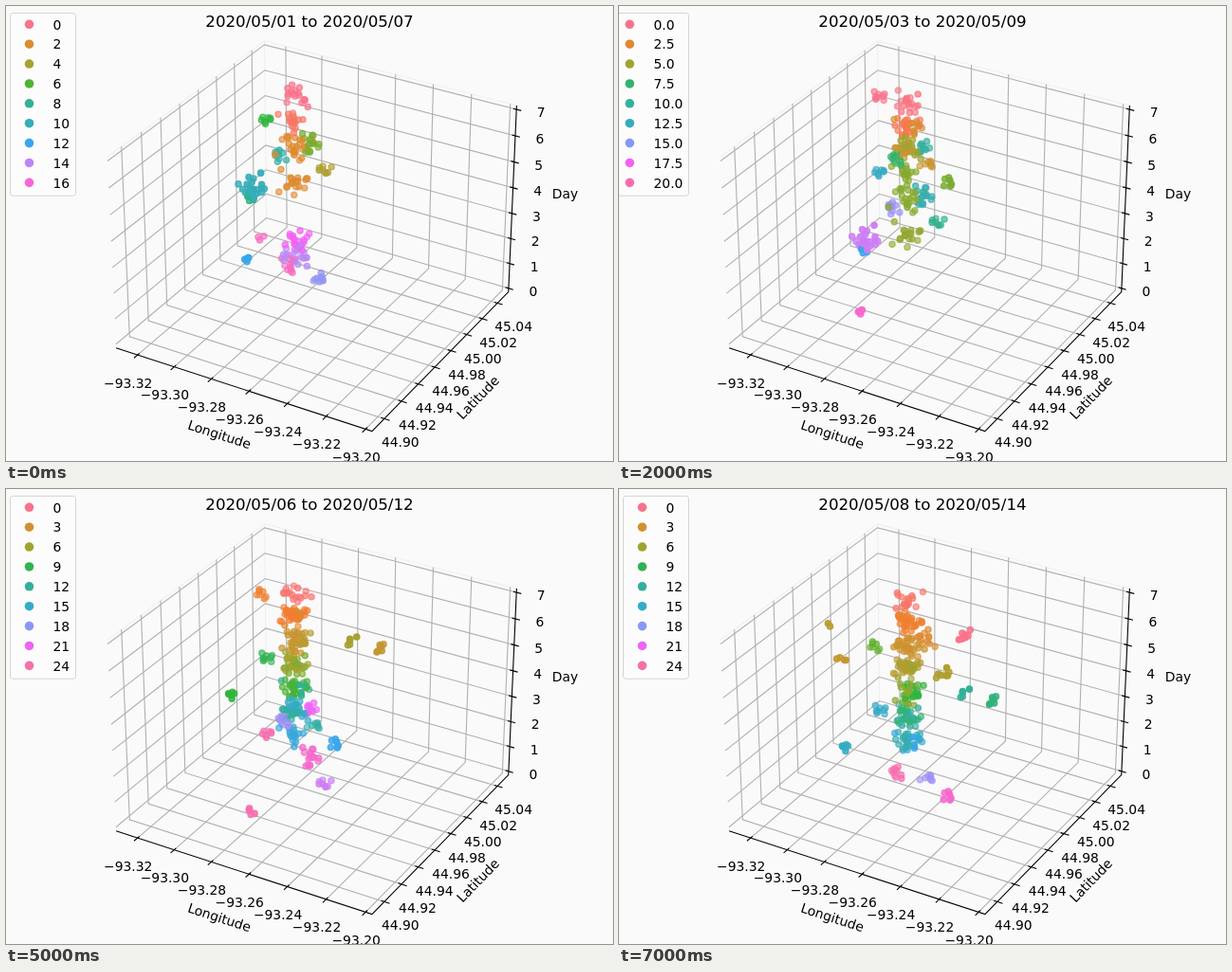
Write an HTML page that moves like this. It is 640 by 480 pixels and loops after 8000 ms.

```html
<!DOCTYPE html>
<html lang="en">
<head>
<meta charset="utf-8">
<title>Clusters by day</title>
<style>
html, body { margin: 0; width: 100%; height: 100%; overflow: hidden; background: #fafafa; }
svg { display: block; width: 640px; height: 480px; font: 13.89px "DejaVu Sans", sans-serif; }
</style>
</head>
<body>
<svg id="stage" viewBox="0 0 640 480" xmlns="http://www.w3.org/2000/svg"></svg>
<script>
const stage = document.getElementById('stage');
const FALL = 27.6;     // pixels a point sinks per day
const DAYS = 8;

function add(parent, tag, attrs, text) {
  const el = document.createElementNS(stage.namespaceURI, tag);
  for (const key in attrs) el.setAttribute(key, attrs[key]);
  if (text !== undefined) el.textContent = text;
  parent.appendChild(el);
  return el;
}
const times = (n, fn) => { for (let i = 0; i < n; i++) fn(i); };

// HUSL colour for a part (0..1) of the hue circle: saturation 90, lightness 65
const RGB = [
  [3.24097, -1.537383, -0.498611],
  [-0.969244, 1.875968, 0.041555],
  [0.05563, -0.203977, 1.056972]
];
function husl(part) {
  const L = 65, a = (part + 0.01) * 359 * Math.PI / 180;
  const s = Math.pow(L + 16, 3) / 1560896;
  let reach = Infinity;
  for (const [p, q, r] of RGB) for (const t of [0, 1]) {
    const low = (632260 * r - 126452 * q) * s + 126452 * t;
    const slope = (284517 * p - 94839 * r) * s / low;
    const base = ((838422 * r + 769860 * q + 731718 * p) * L * s - 769860 * t * L) / low;
    const len = base / (Math.sin(a) - slope * Math.cos(a));
    if (len > 0) reach = Math.min(reach, len);
  }
  const c = reach * 0.9 / (13 * L);
  const u = c * Math.cos(a) + 0.19783, v = c * Math.sin(a) + 0.46832;
  const Y = Math.pow((L + 16) / 116, 3), X = 9 * Y * u / (4 * v);
  const Z = (9 * Y - 15 * v * Y - v * X) / (3 * v);
  const out = RGB.map(([p, q, r]) => {
    const n = p * X + q * Y + r * Z;
    const g = n <= 0.0031308 ? 12.92 * n : 1.055 * Math.pow(n, 1 / 2.4) - 0.055;
    return Math.round(255 * Math.max(0, Math.min(1, g)));
  });
  return `rgb(${out})`;
}

// Perspective view of the box; arguments run 0..1 along each axis
function project(fx, fy, fz) {
  const x = (fx - 0.5) * 1.1428, y = (fy - 0.5) * 1.1428, z = (fz - 0.5) * 0.846;
  const k = 10 / (10 - (0.433 * x - 0.75 * y + 0.5 * z));
  return [326.6 + 270.5 * k * (0.866 * x + 0.5 * y),
          233.2 - 271.5 * k * (-0.25 * x + 0.433 * y + 0.866 * z)];
}
function line(color, ...pts) {
  const points = pts.map(p => project(...p).map(n => n.toFixed(2)).join()).join(' ');
  add(stage, 'polyline', { points, fill: 'none', stroke: color, 'stroke-width': 1.11 });
}
function label(p, dx, dy, text) {
  const [x, y] = project(...p);
  add(stage, 'text', { x: x + dx, y: y + dy + 5, 'text-anchor': 'middle' }, text);
}
function axisName(x, y, turn, text) {
  add(stage, 'text', { transform: `translate(${x} ${y}) rotate(${turn})`, y: 5, 'text-anchor': 'middle' }, text);
}

const GRID = '#b0b0b0', INK = '#000', EDGE = '#f0f0f0';
const tickX = i => 0.088 + 0.148 * i;
const tickY = i => 0.083 + 0.1185 * i;
const tickZ = i => 0.02 + 0.96 * i / 7;

function drawAxes() {
  line(EDGE, [0, 0, 1], [0, 1, 1], [1, 1, 1]);
  line(EDGE, [0, 1, 0], [0, 1, 1]);
  times(7, i => { const f = tickX(i); line(GRID, [f, 0, 0], [f, 1, 0], [f, 1, 1]); });
  times(8, i => { const f = tickY(i); line(GRID, [1, f, 0], [0, f, 0], [0, f, 1]); });
  times(8, i => { const f = tickZ(i); line(GRID, [0, 0, f], [0, 1, f], [1, 1, f]); });
  line(INK, [0, 0, 0], [1, 0, 0], [1, 1, 0], [1, 1, 1]);
  times(7, i => {
    const f = tickX(i);
    line(INK, [f, 0.012, 0], [f, -0.022, 0]);
    label([f, 0, 0], -10, 29.5, '\u2212' + (93.32 - 0.02 * i).toFixed(2));
  });
  times(8, i => {
    const f = tickY(i);
    line(INK, [0.988, f, 0], [1.02, f, 0]);
    label([1, f, 0], 17, 25, (44.9 + 0.02 * i).toFixed(2));
  });
  times(8, i => {
    const f = tickZ(i);
    line(INK, [0.988, 1, f], [1.018, 1, f]);
    label([1, 1, f], 26, 3, i);
  });
  axisName(225, 452, 18, 'Longitude');
  axisName(497.5, 413, -46, 'Latitude');
  axisName(589.5, 198, 0, 'Day');
}

let seed = 11;
function rand() {
  seed = (seed * 16807) % 2147483647;
  return seed / 2147483647;
}
const spread = r => (rand() + rand() - 1) * r * 1.2;

// A cluster appears on day `first` around x, y; it then sinks and moves along
// the hue circle by `rate` a day. More points make it wider.
const points = [];
function cluster(first, hue, n, x, y, days = 7, rate = 0.12) {
  const r = 2.5 + 0.55 * n;
  const near = Math.abs(x - 300) > 38 ? 0.92 : 0.68;
  times(n, () => points.push({
    first, hue, days, rate,
    x: x + spread(r * 1.15), y: y + spread(r),
    alpha: near * (0.85 + 0.23 * rand())
  }));
}

function fillData() {
  // The busy column: new arrivals at the top every day
  times(DAYS, d => {
    const y = 96 + 3 * d, rate = 0.12 - 0.012 * d;
    cluster(d, 0.005 * d, 17, 306, y, 7, rate);
    cluster(d, 0.04 + 0.005 * d, 17, 303, y + 24, 6, rate);
  });
  // Lower column, already there on the first day
  cluster(0, 0.1, 24, 304, 152, 5, 0.09);
  cluster(0, 0.1, 19, 305, 186, 4, 0.08);
  cluster(0, 0.85, 18, 306, 250, 2);
  cluster(0, 0.77, 17, 304, 265, 1);
  cluster(0, 0.92, 10, 299, 274, 1);
  // Places around it
  cluster(0, 0.3, 16, 321, 146, 6);
  cluster(0, 0.2, 8, 334, 173);
  cluster(0, 0.35, 7, 276, 119, 6);
  cluster(0, 0.5, 9, 287, 160, 3);
  cluster(0, 0.56, 20, 260, 190, 3);
  cluster(0, 0.42, 5, 257, 204, 6);
  cluster(0, 0.66, 5, 256, 267, 3);
  cluster(0, 0.73, 9, 331, 288, 1);
  cluster(0, 0.92, 3, 268, 246, 1);

  cluster(1, 0.02, 7, 325, 139);
  cluster(1, 0.26, 10, 292, 131);
  cluster(1, 0.18, 6, 346, 158);
  cluster(1, 0.36, 9, 322, 120, 6);
  cluster(2, 0, 8, 276, 95);
  cluster(3, 0.11, 7, 239, 162);
  cluster(5, 0.08, 7, 268, 109);
  cluster(5, 0.22, 5, 366, 159);
  cluster(5, 0.16, 6, 396, 168);
  cluster(6, 0.08, 7, 343, 168);
  cluster(7, 0, 7, 365, 154);
  cluster(7, 0.1, 12, 322, 157);
  cluster(7, 0.18, 2, 221, 143);
  cluster(7, 0.15, 4, 234, 180);
  points.sort((p, q) => p.alpha - q.alpha);
}

function drawPoints(group, day) {
  for (const p of points) {
    const age = day - p.first;
    if (age < 0 || age >= p.days) continue;
    const color = husl(Math.min(0.95, p.hue + p.rate * age));
    add(group, 'circle', {
      cx: (p.x + (326 - p.x) * 0.004 * age).toFixed(2),
      cy: (p.y + FALL * age).toFixed(2),
      r: 3.1, fill: color, 'fill-opacity': p.alpha,
      stroke: color, 'stroke-opacity': p.alpha, 'stroke-width': 1.39
    });
  }
}

const tops = [17, 18, 20, 20, 20, 24, 22, 24];    // highest cluster number per day

function drawLegend(group, day) {
  const top = tops[day], step = top > 22 ? 3 : top > 18 ? 2.5 : 2;
  const wide = step === 2.5, left = wide ? -8.5 : 4.5;
  const rows = Math.floor(top / step) + 1;
  add(group, 'rect', { x: left, y: 7.5, width: 73.5 - left, height: rows * 20.9 + 4.6,
    rx: 2.8, fill: '#fff', 'fill-opacity': 0.5, stroke: '#ccc', 'stroke-opacity': 0.8 });
  times(rows, i => {
    const v = i * step, y = 19.3 + 20.88 * i;
    const whole = v % 1 ? 2 * Math.round(v / 2) : v;    // halves go to the even side
    add(group, 'circle', { cx: wide ? 11.3 : 24.5, cy: y, r: 4.8, fill: husl(whole / (top + 1)) });
    add(group, 'text', { x: wide ? 36.5 : 49.5, y: y + 5.2 }, wide ? v.toFixed(1) : v);
  });
}

drawAxes();
fillData();
const live = add(stage, 'g', {});
let shown = -1;

function render(now) {
  const day = Math.floor(now / 1000) % DAYS;
  if (day === shown) return;
  shown = day;
  live.replaceChildren();
  drawPoints(live, day);
  const date = d => '2020/05/' + String(d).padStart(2, '0');
  add(live, 'text', { x: 320, y: 22, 'text-anchor': 'middle', 'font-size': 16.67 },
    `${date(day + 1)} to ${date(day + 7)}`);
  drawLegend(live, day);
}
let start;
function tick(now) {
  if (start === undefined) start = now;
  render(now - start);
  requestAnimationFrame(tick);
}
render(0);
requestAnimationFrame(tick);
</script>
</body>
</html>
```
